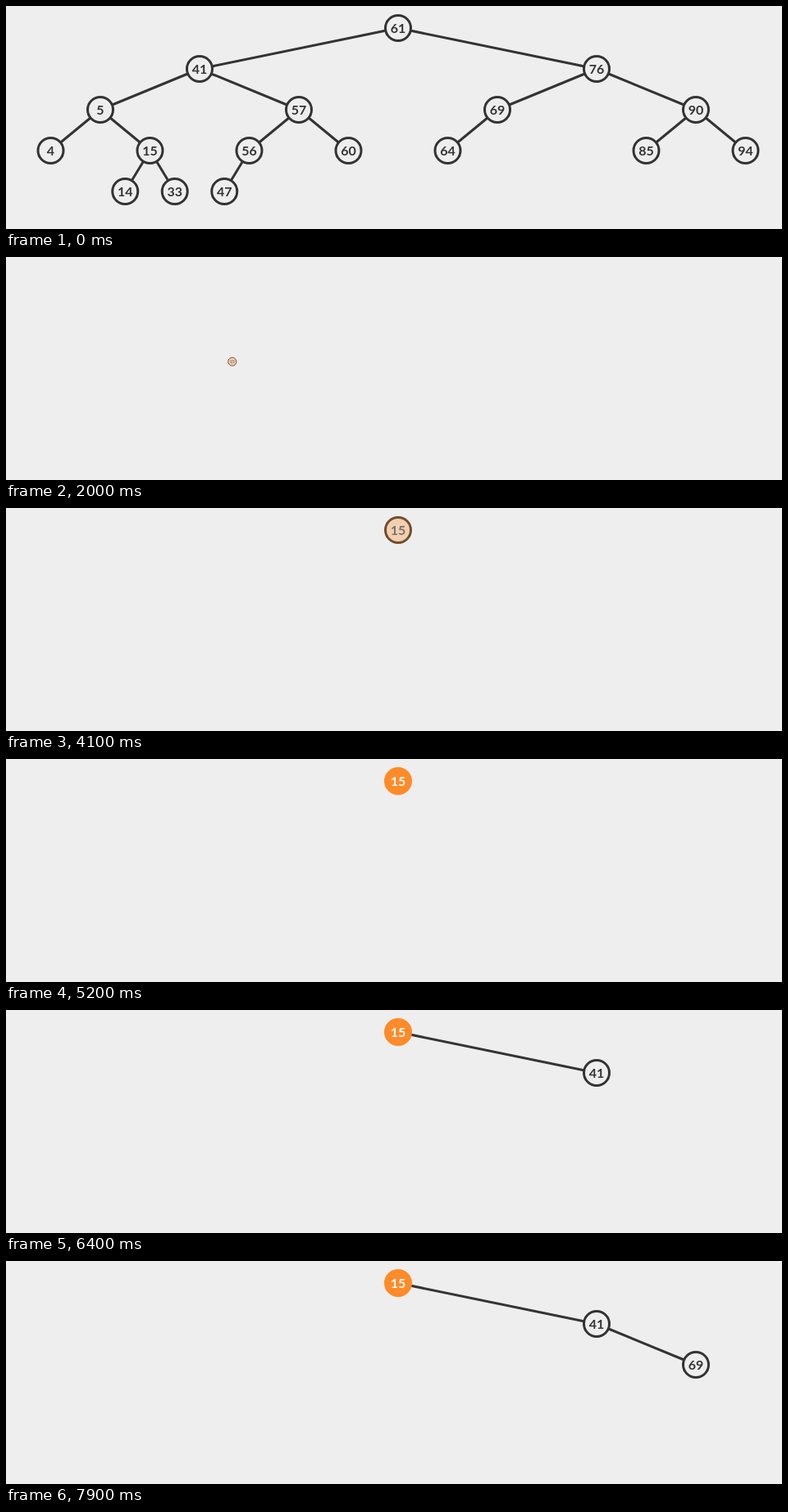
These frames come from a looping animation (946x273 px, 8000 ms). An HTML page:

```html
<!DOCTYPE html>
<html lang="en">
<head>
<meta charset="utf-8">
<title>Binary search tree</title>
<style>
  html, body { margin: 0; width: 100%; height: 100%; overflow: hidden; background: #eee; }
  svg { display: block; width: 946px; height: 273px; }
  line { stroke-width: 3; }
  text { font: 700 16px Lato, "Open Sans", sans-serif; text-anchor: middle; }
</style>
</head>
<body>
<svg viewBox="0 0 946 273"></svg>
<script>
const LOOP = 8000, STEP = 100, TREE_END = 800, PHASE = 375;
const svg = document.querySelector('svg');

const DARK = [51, 51, 51], PAPER = [238, 238, 238], ORANGE = [255, 138, 39], WHITE = [255, 255, 255];
// fill, border, label
const LOOKS = {
  plain: [PAPER, DARK, DARK],
  active: [ORANGE, ORANGE, WHITE],
  passed: [PAPER, ORANGE, ORANGE]
};

const rgb = c => `rgb(${c.map(Math.round)})`;
const lerp = (a, b, f) => a + (b - a) * f;
const mix = (a, b, f) => a.map((v, i) => lerp(v, b[i], f));
const ease = p => p < 0.5 ? 4 * p ** 3 : 1 - 4 * (1 - p) ** 3;
const progress = (t, start, span) => ease(Math.min(1, Math.max(0, (t - start) / span)));

function add(parent, tag, attrs = {}) {
  const el = document.createElementNS('http://www.w3.org/2000/svg', tag);
  set(el, attrs);
  return parent.appendChild(el);
}

function set(el, attrs) {
  for (const key in attrs) el.setAttribute(key, attrs[key]);
}

// Heap-style slot: 1 is the root, children of n are 2n and 2n + 1
function place(slot) {
  const depth = Math.floor(Math.log2(slot));
  const index = slot - 2 ** depth;
  return [478 + 484 * ((index + 0.5) / 2 ** depth - 0.5) * 2, 27 + 50 * depth];
}

function addEdge(parent, from, to) {
  const [x1, y1] = place(from), [x2, y2] = place(to);
  return add(parent, 'line', { x1, y1, x2, y2, stroke: rgb(DARK) });
}

function addNode(parent, slot, value) {
  const g = add(parent, 'g', { transform: `translate(${place(slot)})` });
  add(g, 'circle', { r: 15.5, 'stroke-width': 3, fill: rgb(PAPER), stroke: rgb(DARK) });
  add(g, 'text', { y: 5.6, fill: rgb(DARK) }).textContent = value;
  return g;
}

// Opening tree
const tree = add(svg, 'g');
const values = {
  1: 61, 2: 41, 3: 76, 4: 5, 5: 57, 6: 69, 7: 90, 8: 4, 9: 15, 10: 56,
  11: 60, 12: 64, 14: 85, 15: 94, 18: 14, 19: 33, 20: 47
};
const slots = Object.keys(values).map(Number);
slots.slice(1).forEach(s => addEdge(tree, s >> 1, s));
slots.forEach(s => addNode(tree, s, values[s]));

// Insertions: each step is [start, look, duration]
const build = add(svg, 'g');
const edges = [
  { from: 1, to: 3, steps: [[5150, 'passed', 443], [5593, 'plain'], [6343, 'passed'], [7093, 'plain'], [7843, 'passed']] },
  { from: 3, to: 7, steps: [[6718, 'passed'], [7093, 'plain']] }
];
const nodes = [
  { slot: 1, value: 15, offset: [-300, 150], steps: [
    [1200, 'active', 1845], [3565, 'plain'], [3940, 'active'], [5150, 'passed', 443], [5593, 'plain'],
    [5968, 'active'], [6343, 'passed'], [7093, 'plain'], [7468, 'active'], [7843, 'passed']] },
  { slot: 3, value: 41, offset: [-22, -9], steps: [
    [5150, 'active', 443], [5593, 'plain'], [6718, 'passed'], [7093, 'plain']] },
  { slot: 7, value: 69, offset: [-22, -9], steps: [[6718, 'active'], [7093, 'plain']] }
];
edges.forEach(e => e.el = addEdge(build, e.from, e.to));
nodes.forEach(n => n.el = addNode(build, n.slot, n.value));

function colours(steps, t) {
  return steps.reduce((now, [start, look, span = PHASE]) => {
    const f = progress(t, start, span);
    return now.map((c, i) => mix(c, LOOKS[look][i], f));
  }, LOOKS.plain);
}

function entry({ el, steps }, t) {
  const [start, , span = PHASE] = steps[0];
  el.style.display = t > start ? '' : 'none';
  return progress(t, start, span);
}

function drawEdge(edge, t) {
  const f = entry(edge, t);
  const a = place(edge.from), b = place(edge.to);
  const [x2, y2] = mix(a, b, f);
  set(edge.el, { x2, y2, stroke: rgb(colours(edge.steps, t)[1]) });
}

function drawNode(node, t) {
  const f = entry(node, t);
  const [x, y] = place(node.slot).map((v, i) => v + node.offset[i] * (1 - f));
  const [fill, stroke, label] = colours(node.steps, t).map(rgb);
  const [disc, text] = node.el.children;
  set(node.el, { transform: `translate(${x} ${y}) scale(${f})` });
  set(disc, { fill, stroke });
  set(text, { fill: label });
}

function draw(now) {
  const t = Math.floor((now % LOOP) / STEP) * STEP;
  tree.style.display = t < TREE_END ? '' : 'none';
  edges.forEach(e => drawEdge(e, t));
  nodes.forEach(n => drawNode(n, t));
}

const begin = performance.now();
function tick() {
  draw(performance.now() - begin);
  requestAnimationFrame(tick);
}
tick();
</script>
</body>
</html>
```
